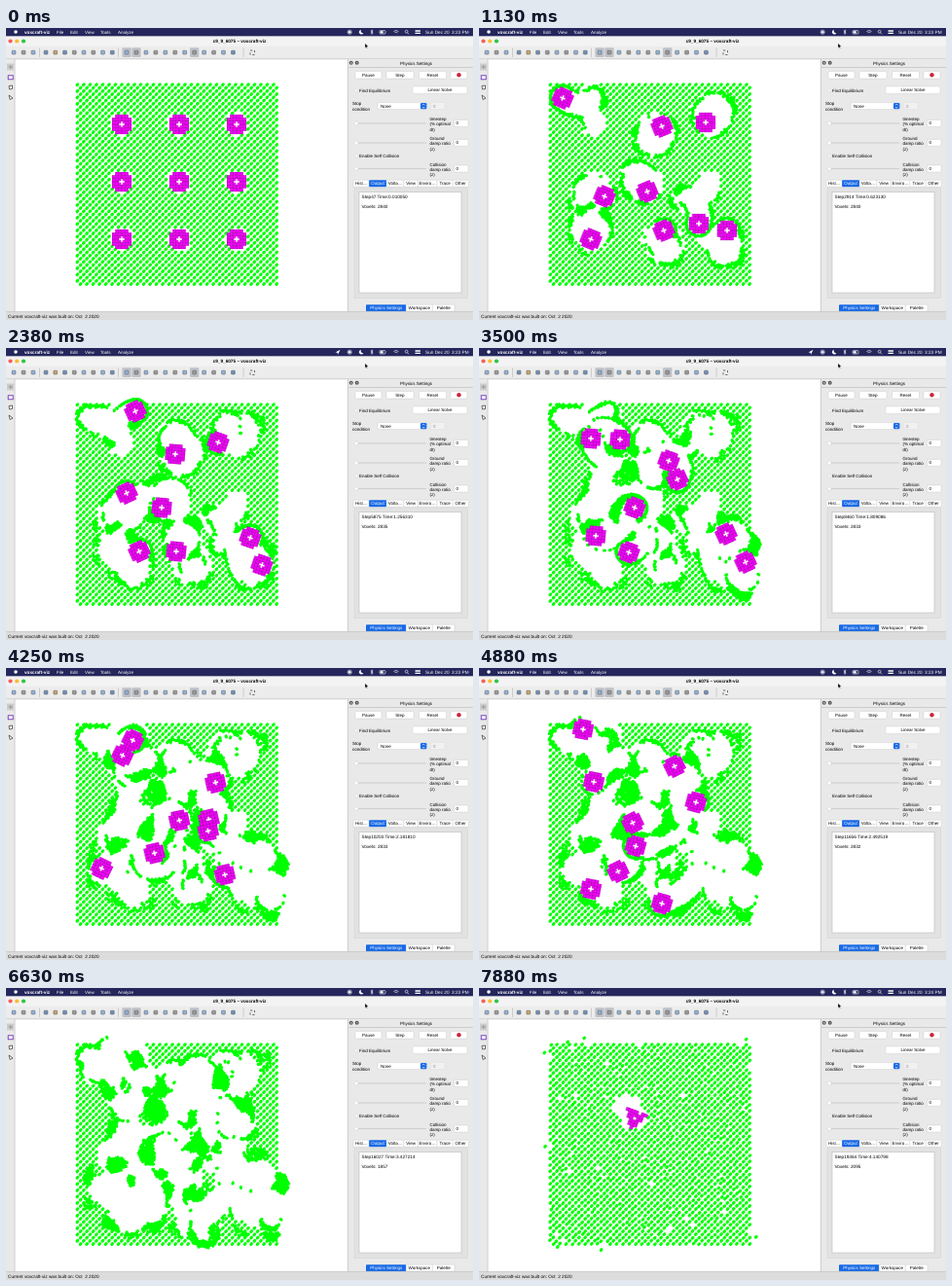
An HTML page with a canvas for the animation above (8000 ms loop, 480 px wide and 300 px high).

```html
<!DOCTYPE html>
<html lang="en">
<head>
<meta charset="utf-8">
<title>Voxel swarm</title>
<style>
html, body { margin: 0; width: 100%; height: 100%; overflow: hidden; background: #fff; }
svg, canvas { position: absolute; display: block; }
svg { left: 0; top: 0; }
canvas { left: 9px; top: 32px; }
text {
  font: 4.5px "Liberation Sans", Arial, sans-serif;
  fill: #000; white-space: pre; text-rendering: geometricPrecision;
}
.t { font-size: 4.7px; }
.b { font-weight: bold; }
.w { fill: #fff; }
.m { text-anchor: middle; }
.btn { fill: #fff; stroke: #c6c6c6; stroke-width: .4; }
.line { stroke: #c4c4c4; stroke-width: .8; }
.blue { fill: #1769e6; }
.thin { fill: none; stroke: #fff; stroke-width: .6; }
</style>
</head>
<body>
<svg width="480" height="300" viewBox="0 0 480 300">
  <rect width="480" height="300" fill="#fff"/>

  <rect width="480" height="8.6" fill="#24265c"/>
  <circle cx="10" cy="4" r="1.8" fill="#fff"/>
  <text class="w b t" x="19" y="5.6">voxcraft-viz</text>
  <text class="w" x="52" y="5.6">File</text>
  <text class="w" x="66" y="5.6">Edit</text>
  <text class="w" x="81" y="5.6">View</text>
  <text class="w" x="97" y="5.6">Tools</text>
  <text class="w" x="115" y="5.6">Analyze</text>
  <text class="w t" id="clock" x="431" y="5.6"></text>
  <path id="arrow" d="M338.5 4.6 343.5 1.8 341 6.9 340.7 4.8Z" fill="#fff"/>
  <circle cx="353.2" cy="4.2" r="2.1" class="thin"/>
  <circle cx="353.2" cy="4.2" r="1.3" fill="#fff"/>
  <path d="M365 1.8a2.4 2.4 0 1 0 2.4 3.5 2.3 2.3 0 0 1-2.4-3.5Z" fill="#fff"/>
  <path d="M374.8 2.8 377.2 5.2 376 6.5V1.8L377.2 3 374.8 5.3" class="thin"/>
  <rect x="384" y="2.6" width="6" height="3.4" rx=".8" class="thin"/>
  <rect x="384.7" y="3.2" width="3" height="2.2" fill="#fff"/>
  <path d="M398.4 3.6q2.6-2.4 5.2 0M399.5 4.8q1.5-1.4 3 0M401 6v.2" class="thin"/>
  <circle cx="411.6" cy="3.7" r="1.4" class="thin"/>
  <path d="M412.6 4.8 414 6.4" class="thin"/>
  <path d="M421 3h4.5M421 5.4h4.5" stroke="#fff" stroke-width="1.3" stroke-linecap="round"/>

  <rect y="8.6" width="480" height="9.8" fill="#f3f3f3"/>
  <rect y="18.4" width="480" height="13.6" fill="#ececec"/>
  <path class="line" d="M0 31.8H480"/>
  <circle cx="4.5" cy="13.5" r="2.1" fill="#fc5b57"/>
  <circle cx="11.2" cy="13.5" r="2.1" fill="#fdbc2e"/>
  <circle cx="18" cy="13.5" r="2.1" fill="#28c840"/>
  <text class="b m t" x="240" y="15.2">c9_9_6075 – voxcraft-viz</text>
  <g id="tools"></g>
  <path d="M369 15.8v4.6l1.1-1 .8 1.7.7-.3-.7-1.7h1.5Z" stroke="#fff" stroke-width=".3"/>

  <rect y="32" width="9" height="260" fill="#e9e9e9"/>
  <path class="line" d="M9 32V292"/>
  <rect x="1" y="36.5" width="7" height="7" fill="#ccc"/>
  <path d="M2.5 40H7M4.7 38V42" stroke="#888" stroke-width=".7"/>
  <rect x="2.2" y="48.8" width="5" height="4" fill="#fff" stroke="#6a32b8" stroke-width=".9"/>
  <path d="M3 59.5 6.5 59V62.5L3.5 63ZM3 69 4 73.500 7 72Z" fill="#fff" stroke="#444" stroke-width=".8"/>

  <rect x="351" y="32" width="129" height="260" fill="#e9e9e9"/>
  <path class="line" d="M351.4 32V292M352 40.5H480"/>
  <circle cx="354.7" cy="35.8" r="2" fill="#555"/>
  <circle cx="360.7" cy="35.8" r="2" fill="#555"/>
  <path d="M353.9 35l1.6 1.6m0-1.6l-1.6 1.6M359.9 35.8h1.6" class="thin"/>
  <text class="m" x="421.5" y="37.5">Physics Settings</text>
  <g id="panel"></g>

  <rect x="358" y="164" width="116.5" height="113.5" fill="#e2e2e2" stroke="#d2d2d2" stroke-width=".5"/>
  <rect x="363" y="168.5" width="105" height="103.5" fill="#fff" stroke="#bbb" stroke-width=".6"/>
  <text class="t" id="step" x="365.5" y="175"></text>
  <text class="t" id="vox" x="365.5" y="185.3"></text>

  <rect y="291.4" width="480" height="8.6" fill="#dcdcdc"/>
  <path class="line" d="M0 291.4H480"/>
  <text class="t" x="2" y="297.6">Current voxcraft-viz was built on: Oct  2 2020</text>
</svg>
<canvas id="view" width="342" height="259"></canvas>

<script>
const $ = id => document.getElementById(id);
const range = (n, f) => Array.from({ length: n }, (_, i) => f(i));

// Interface
const rect = (x, y, w, h, cls = 'btn', r = 1.2) =>
  `<rect class="${cls}" x="${x}" y="${y}" width="${w}" height="${h}" rx="${r}"/>`;
const label = (s, x, y, cls = '') => `<text class="${cls}" x="${x}" y="${y}">${s}</text>`;
const button = (s, x, y, w) => rect(x, y, w, 7.6) + label(s, x + w / 2, y + 5.4, 'm');
const check = (s, y) => rect(358.6, y - 3.2, 3, 3) + label(s, 363, y);
const field = (x, y, w) => rect(x, y, w, 7, 'btn', .4) + label('0', x + 2, y + 5);
const slider = (y, lines) =>
  `<path class="line" d="M358 ${y}H432"/><circle class="btn" cx="360" cy="${y}" r="2"/>` +
  lines.map((s, i) => label(s, 435.5, y - 3 + i * 5.4)).join('') + field(460.5, y - 3.6, 14.5);

function tabs(names, active, x, y, pad, perChar) {
  return names.map(s => {
    const w = pad + perChar * s.length, on = s === active, left = x;
    x += w;
    return rect(left, y, w, 7, on ? 'blue' : 'btn', .8) + label(s, left + w / 2, y + 5.1, on ? 'm w' : 'm');
  }).join('');
}

$('panel').innerHTML =
  button('Pause', 359, 44.5, 27) + button('Step', 391, 44.5, 28) + button('Reset', 424.5, 44.5, 28) +
  button('', 457, 44.5, 17) + '<circle cx="465.5" cy="48.3" r="2.2" fill="#c8283c"/>' +
  check('Find Equilibrium', 65.8) + button('Linear Solve', 418, 60, 56) +
  label('Stop', 356, 79.4) + label('condition', 356, 84.7) +
  rect(382, 76.6, 51, 7) + label('None', 385, 81.7) + rect(426, 77, 6.4, 6.2, 'blue') +
  '<path class="thin" d="M428 79.3l1.2-1.3 1.2 1.3M428 81l1.2 1.3 1.2-1.3"/>' +
  `<g opacity=".4">${field(437, 76.6, 14)}</g>` +
  slider(98, ['timestep', '(% optimal', 'dt)']) +
  slider(118, ['Ground', 'damp ratio', '(z)']) +
  check('Enable Self Collision', 133) +
  slider(144.6, ['Collision', 'damp ratio', '(z)']) +
  tabs(['Hist…', 'Output', 'Volta…', 'View', 'Enviro…', 'Trace', 'Other'], 'Output', 357, 156.3, 7.4, 1.75) +
  tabs(['Physics Settings', 'Workspace', 'Palette'], 'Physics Settings', 370, 284.2, 8.5, 2.05);

const tints = ['#8fb3dc', '#6d90bd', '#9a9a9a', '#c9a560'];
const icon = (x, on) =>
  (on ? rect(x - 4.6, 20.2, 9.2, 9.8, '', 1).replace('<rect', '<rect fill="#bfc1c9"') : '') +
  `<rect x="${x - 1.9}" y="23.200" width="3.800" height="3.800" rx=".6" fill="${tints[Math.round(x) % 4]}" stroke="#555" stroke-width=".5"/>`;
$('tools').innerHTML =
  range(3, i => icon(8 + 10 * i)).join('') +
  range(8, i => icon(41 + 9.75 * i)).join('') +
  range(12, i => icon(124 + 9.95 * i, i < 2 || i === 7)).join('') +
  [34.5, 115.5, 244].map(x => `<path class="line" d="M${x} 20.500V30"/>`).join('') +
  '<rect x="251" y="23" width="4.500" height="4.500" fill="none" stroke="#333" stroke-width=".7" stroke-dasharray="2.250"/>';

// World: a checkerboard of pellets, nine bots sweeping through it
const STEP = 125, FRAMES = 64, GONE = 47, REFILL = 54;
const SIDE = 64, PITCH = 3.25, REACH = 12.6, SLANT = -Math.PI / 4;
const birth = [151, 121];
let seed = 7;
const rand = () => {
  seed = (seed * 1664525 + 1013904223) >>> 0;
  return seed / 4294967296;
};
const mix = (a, b, u) => a + (b - a) * u;

// A bot starts on the 3 by 3 grid, passes its key points, then heads partly home
const turns = [0, 9, 19, 28, 39, GONE];
const bots = [];
function addBot(...stops) {
  const i = bots.length, home = [119 + i % 3 * 59, 99 + Math.floor(i / 3) * 59];
  const last = stops[stops.length - 1];
  bots.push([home, ...stops, last.map((v, k) => mix(v, home[k], .4))]);
}
addBot([86, 72], [133, 65], [145, 94], [118, 117]);
addBot([188, 101], [174, 109], [195, 116], [201, 101]);
addBot([233, 97], [218, 97], [204, 135], [223, 138]);
addBot([129, 173], [124, 149], [115, 93], [107, 63]);
addBot([173, 168], [160, 164], [160, 164], [158, 159]);
addBot([226, 201], [251, 195], [254, 191], [161, 183]);
addBot([115, 217], [137, 209], [120, 193], [115, 227]);
addBot([190, 208], [175, 209], [154, 210], [143, 209]);
addBot([255, 208], [263, 223], [274, 220], [188, 242]);

// Every leg is a straight move plus one clockwise loop beside it
function botAt(path, n) {
  let s = 0;
  while (s < 4 && n >= turns[s + 1]) s++;
  const u = (n - turns[s]) / (turns[s + 1] - turns[s]), [a, b] = [path[s], path[s + 1]];
  const heading = Math.atan2(b[1] - a[1], b[0] - a[0]), c = Math.cos(heading), d = Math.sin(heading);
  const ahead = 10 * Math.sin(2 * Math.PI * u), aside = 10 * (1 - Math.cos(2 * Math.PI * u));
  return [mix(a[0], b[0], u) + c * ahead - d * aside, mix(a[1], b[1], u) + d * ahead + c * aside];
}

const lattice = [];
for (let j = 0; j < SIDE; j++)
  for (let i = j % 2; i < SIDE; i += 2)
    lattice.push({
      x: 73.4 + i * PITCH, y: 58.2 + j * PITCH, rim: i < 2 || j < 2 || i > SIDE - 3 || j > SIDE - 3,
      turn: rand() * Math.PI, dx: rand() - .5, dy: rand() - .5, odd: rand()
    });

const pellets = lattice
  .filter(p => bots.every(([home]) => Math.hypot(p.x - home[0], p.y - home[1]) > 11.8))
  .map(p => ({ x: p.x, y: p.y, turn: p.turn, loose: false }));

// Swept pellets clump around scattered places
const piles = [birth, ...range(34, () => [68 + rand() * 216, 50 + rand() * 220])];

function gather(p, speed) {
  let best = 30, goal = null;
  for (const q of piles) {
    const d = Math.hypot(q[0] - p.x, q[1] - p.y);
    if (d < best) { best = d; goal = q; }
  }
  if (!goal || best < 3) return;
  p.x += (goal[0] - p.x) / best * speed;
  p.y += (goal[1] - p.y) / best * speed;
}

function spread() {
  const gap = 2.5, cells = new Map(), key = (x, y) => x * 512 + y;
  for (const p of pellets) {
    p.cx = Math.floor(p.x / gap);
    p.cy = Math.floor(p.y / gap);
    const k = key(p.cx, p.cy);
    if (cells.has(k)) cells.get(k).push(p); else cells.set(k, [p]);
  }
  for (const p of pellets) {
    if (!p.loose) continue;
    for (let i = -1; i < 2; i++) for (let j = -1; j < 2; j++)
      for (const q of cells.get(key(p.cx + i, p.cy + j)) || []) {
        if (q === p) continue;
        const dx = p.x - q.x, dy = p.y - q.y, d = Math.hypot(dx, dy) || .01;
        if (d >= gap) continue;
        const f = (gap - d) / d * .3;
        p.x += dx * f; p.y += dy * f;
        if (q.loose) { q.x -= dx * f; q.y -= dy * f; }
      }
  }
}

function advance(n) {
  const spots = n < GONE ? bots.map(b => botAt(b, n)) : [];
  for (const p of pellets) {
    let near = false;
    for (const [bx, by] of spots) {
      const dx = p.x - bx, dy = p.y - by, d = Math.hypot(dx, dy) || .01;
      if (d < 20) near = true;
      if (d < REACH) {
        p.loose = true;
        p.x = bx + dx / d * REACH;
        p.y = by + dy / d * REACH;
      }
    }
    if (p.loose) gather(p, near ? .4 : .07);
  }
  spread();
}

const history = range(REFILL, n => {
  const now = pellets.map(p => [p.x, p.y, p.loose ? p.turn : SLANT]);
  for (let k = 1; k <= 4; k++) advance(n + k / 4);
  return now;
});

// After the refill one offspring crawls away from its birthplace
const age = n => (n - REFILL) / (FRAMES - 1 - REFILL);
const childAt = n => [birth[0] + 9 * age(n), birth[1] + 13 * age(n)];

function refilled(n) {
  const u = age(n), trail = range(n - REFILL + 1, k => childAt(REFILL + k));
  return lattice
    .filter(p => p.odd > .012 * u && trail.every(([x, y]) => Math.hypot((p.x - x) * .85, p.y - y) > 11.5))
    .map(p => {
      const jitter = u * (p.odd > .9 ? 2 : .5), fling = p.rim && p.odd > .97 ? .06 * u : 0;
      return [p.x + jitter * p.dx + fling * (p.x - 176), p.y + jitter * p.dy + fling * (p.y - 161), SLANT];
    });
}

// Voxel bodies: a square without corners, and a ragged wedge
const square = range(36, i => [i % 6 - 2.5, Math.floor(i / 6) - 2.5])
  .filter(([x, y]) => Math.abs(x) + Math.abs(y) < 5);
const wedge = range(42, i => [i % 7 - 3, Math.floor(i / 7) - 2])
  .filter(([x, y]) => Math.abs(x) <= 2 - y / 2 && rand() > .1);

// Drawing
const ctx = $('view').getContext('2d');

function drawPellets(list) {
  ctx.beginPath();
  for (const [x, y, a] of list) {
    const c = .5 * Math.cos(a), s = .5 * Math.sin(a);
    ctx.moveTo(x - c, y - s);
    ctx.lineTo(x + c, y + s);
  }
  ctx.lineCap = 'round';
  ctx.lineWidth = 3.1;
  ctx.strokeStyle = '#00ff00';
  ctx.stroke();
}

function drawBody(cells, [x, y], angle, cross) {
  const size = 3.3;
  ctx.save();
  ctx.translate(x, y);
  ctx.rotate(angle);
  ctx.fillStyle = '#f000f5';
  ctx.strokeStyle = 'rgba(110, 0, 125, .55)';
  ctx.lineWidth = .4;
  for (const [i, j] of cells) {
    const left = (i - .5) * size, top = (j - .5) * size;
    ctx.fillRect(left - .1, top - .1, size + .2, size + .2);
    ctx.strokeRect(left, top, size, size);
  }
  ctx.fillStyle = '#fff';
  ctx.fillRect(-cross, -.8, 2 * cross, 1.6);
  ctx.fillRect(-.8, -cross, 1.6, 2 * cross);
  ctx.restore();
}

function drawChild(n) {
  ctx.save();
  ctx.beginPath();
  drawBody(wedge, childAt(n), .35 * age(n), 0);
  ctx.restore();
}

const wobble = (i, n) => Math.min(1, n / 4) * .45 * Math.sin(n * .23 + i * 2.1);

// Counters
const marks = [0, 9, 19, 28, 39, 53, 63], counts = [47, 2914, 5875, 8460, 11656, 16027, 19364];
function stepAt(n) {
  let s = 0;
  while (s < marks.length - 2 && n >= marks[s + 1]) s++;
  return Math.round(mix(counts[s], counts[s + 1], (n - marks[s]) / (marks[s + 1] - marks[s])));
}
function voxelsAt(n) {
  if (n >= REFILL) return 2095;
  if (n >= GONE) return 1857;
  return 2840 - Math.round(8 * (1 - Math.exp(-Math.max(0, n - 9) / 10)));
}

function draw(n) {
  ctx.setTransform(1, 0, 0, 1, -9, -32);
  ctx.clearRect(9, 32, 342, 259);
  drawPellets(n < REFILL ? history[n] : refilled(n));
  if (n < GONE) bots.forEach((b, i) => drawBody(square, botAt(b, n), wobble(i, n), 2.8));
  if (n >= REFILL) drawChild(n);

  const step = stepAt(n);
  $('step').textContent = `Step${step} Time:${(step * .00021384).toFixed(6)}`;
  $('vox').textContent = `Voxels: ${voxelsAt(n)}`;
  $('clock').textContent = `Sun Dec 20  3:${n < 58 ? 23 : 24} PM`;
  $('arrow').style.display = n >= 15 && n < 31 ? '' : 'none';
}

let shown = -1;
function tick() {
  const n = Math.floor(performance.now() / STEP) % FRAMES;
  if (n !== shown) draw(shown = n);
  requestAnimationFrame(tick);
}
tick();
</script>
</body>
</html>
```
